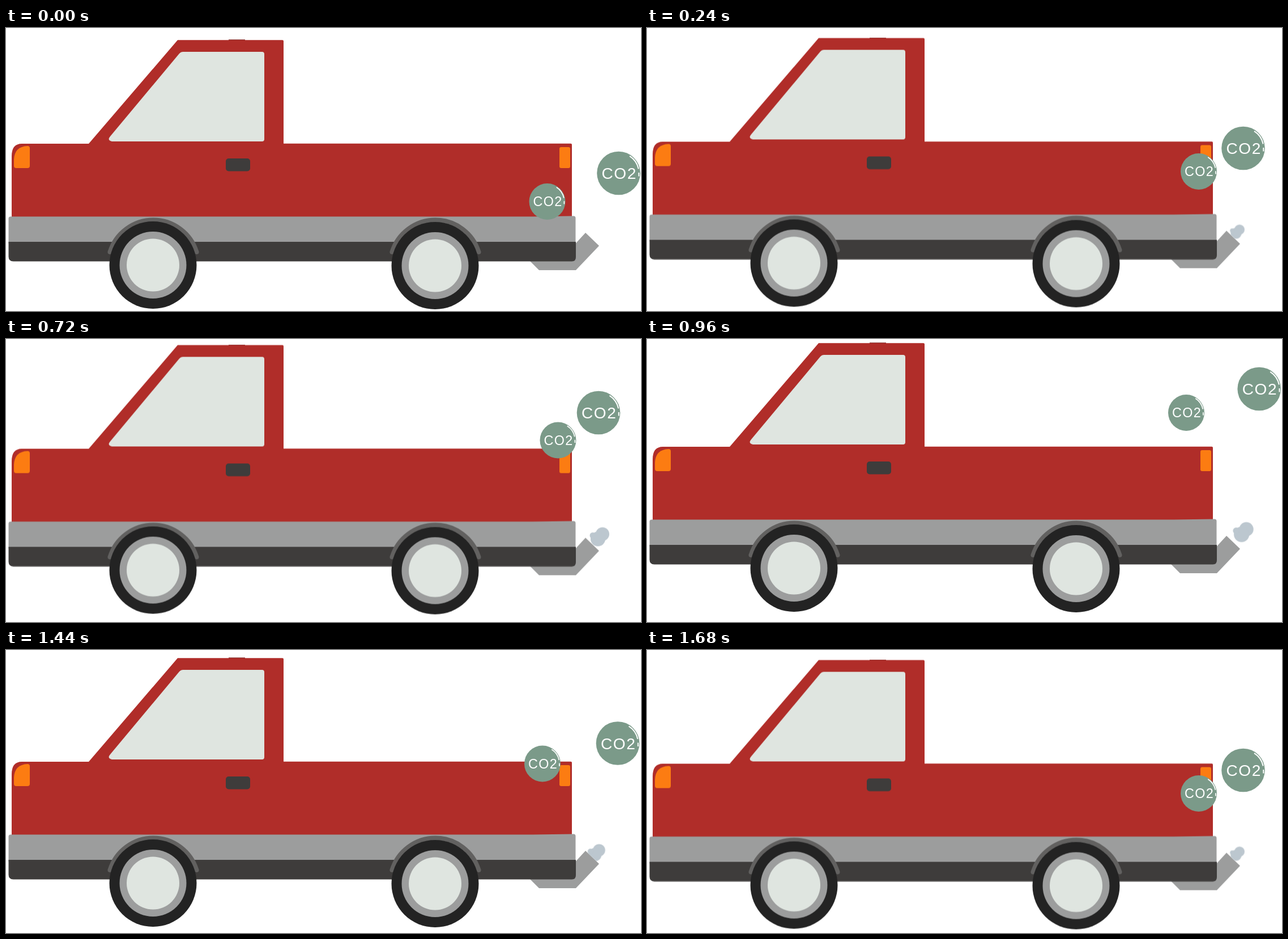
Write an HTML page that moves like this. It is 1121x499 px and loops after 1920 ms.

```html
<!DOCTYPE html>
<html lang="en">
<head>
<meta charset="utf-8">
<title>Pickup exhaust</title>
<style>
  html, body { margin: 0; width: 100%; height: 100%; overflow: hidden; background: #fff; }
  svg { display: block; width: 100%; height: 100%; }

  .red { fill: #b02d29; }
  .grey { fill: #9c9d9d; }
  .dark { fill: #3e3c3b; }
  .pale { fill: #dfe5e0; }
  .lamp { fill: #fc7c12; }
  .smoke { fill: #bcc7cf; }
  .gas { fill: #7b9a89; }
  .shine { fill: none; stroke: #fff; stroke-width: 2; }
  text { font: 28px "Liberation Sans", Arial, sans-serif; letter-spacing: 1.6px; text-anchor: middle; fill: #fff; }

  /* Five held poses, played forth and back */
  .car, .smoke, .small, .big { animation: 1920ms step-end infinite; }
  .car { animation-name: car; }
  .smoke { animation-name: smoke; transform-origin: 1053px 354.5px; }
  .small { animation-name: small; }
  .big { animation-name: big; }

  @keyframes car {
    0%, 100% { transform: translateY(0); }
    12.5%, 87.5% { transform: translateY(-3.5px); }
    25%, 75% { transform: translateY(-7px); }
    37.5%, 62.5% { transform: translateY(-10.5px); }
    50% { transform: translateY(-14px); }
  }
  @keyframes smoke {
    0%, 100% { transform: translate(-40px, 40px) scale(.6); }
    12.5%, 87.5% { transform: translate(-7px, 4.5px) scale(.75); }
    25%, 75% { transform: translate(-6px, 5.5px) scale(.9); }
    37.5%, 62.5% { transform: translate(0, 0); }
    50% { transform: translate(5px, -5px) scale(1.05); }
  }
  @keyframes small {
    0%, 100% { transform: translate(955.5px, 306px) scale(.835); }
    12.5%, 87.5% { transform: translate(974px, 253px) scale(.835); }
    25%, 75% { transform: translate(947px, 200.5px) scale(.835); }
    37.5%, 62.5% { transform: translate(974.5px, 178.5px) scale(.835); }
    50% { transform: translate(952px, 130px) scale(.835); }
  }
  @keyframes big {
    0%, 100% { transform: translate(1081.5px, 256px); }
    12.5%, 87.5% { transform: translate(1052.5px, 212px); }
    25%, 75% { transform: translate(1080px, 164.5px); }
    37.5%, 62.5% { transform: translate(1046px, 130px); }
    50% { transform: translate(1080.7px, 88px); }
  }
</style>
</head>
<body>
<svg viewBox="0 0 1121 499" preserveAspectRatio="none">
  <defs>
    <clipPath id="mouth"><path d="M1023 361L1047 384H1121V290H1023Z"/></clipPath>
    <g id="wheel">
      <circle r="77" fill="#232323"/>
      <circle r="59" class="grey"/>
      <circle r="46.5" class="pale"/>
    </g>
    <path id="arch" d="M-76.5 -23.5A80 80 0 0 1 76.5 -23.5" fill="none" stroke="#626160" stroke-width="8" stroke-linecap="round"/>
    <g id="bubble">
      <circle r="38.3" class="gas"/>
      <text x="1.2" y="10">CO2</text>
      <path class="shine" d="M19.5 -30.2A36 36 0 0 1 35.2 -7.5M35.8 -1V5.5"/>
    </g>
  </defs>

  <g class="car">
    <path class="grey" d="M925 411L941 427H1006L1047 384L1023 361L1000 386Z"/>
    <g clip-path="url(#mouth)">
      <g class="smoke">
        <circle cx="1053" cy="354.5" r="12"/>
        <circle cx="1045" cy="363" r="13"/>
        <circle cx="1036" cy="357" r="5.5"/>
      </g>
    </g>

    <rect x="393" y="20.3" width="29" height="2" fill="#7d2623"/>
    <path class="red" d="M10 335V226Q10 204 28 204H146L303 21.3H488Q490 21.3 490 23.3V203.7H997Q999 203.7 999 205.7V335Z"/>
    <path class="pale" d="M312 42H452Q456 42 456 46V196Q456 200 452 200H187Q178 198 184 191L306 45Q308.500 42 312 42Z"/>
    <path class="lamp" d="M42 212V243Q42 247 38 247H18Q14 247 14 243V232Q15 209 38 208Q42 208 42 212Z"/>
    <rect class="lamp" x="977" y="210" width="19" height="37" rx="3"/>
    <rect class="dark" x="388" y="230" width="43" height="22.500" rx="5"/>

    <path class="grey" d="M4.500 380V336Q4.500 332.500 8 332.500H930L1002 331.500Q1005.500 331.500 1005.500 335V380Z"/>
    <path class="dark" d="M4.500 377H1006V404Q1006 411.500 999 411.500H13Q4.500 411.500 4.500 403Z"/>

    <use href="#arch" x="260" y="418.500"/>
    <use href="#arch" x="758" y="418.500"/>
    <use href="#wheel" x="259.500" y="418"/>
    <use href="#wheel" x="757.500" y="419"/>
  </g>

  <g class="small"><use href="#bubble"/></g>
  <g class="big"><use href="#bubble"/></g>
</svg>
</body>
</html>
```
